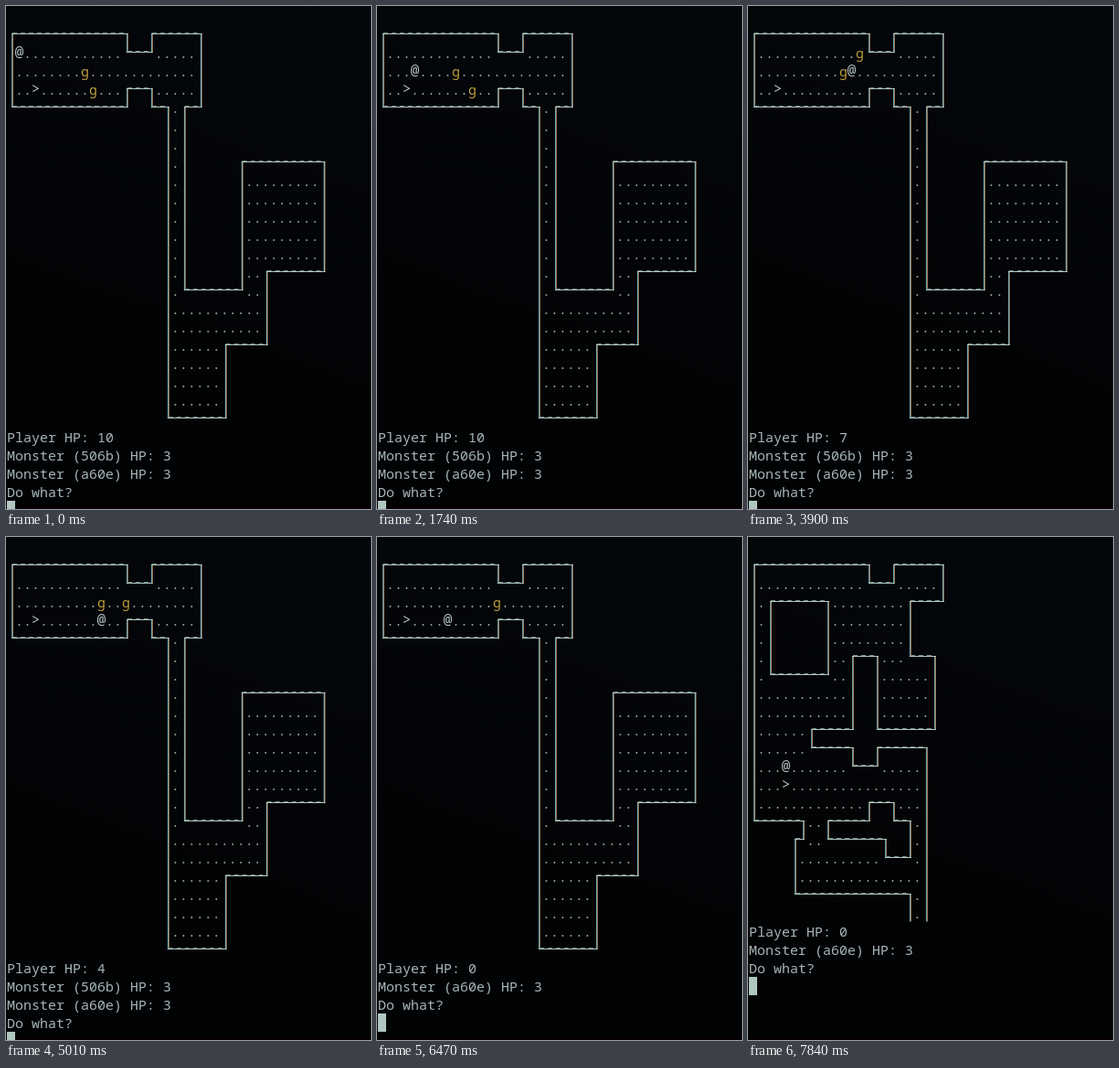
Write an HTML page that moves like this. It is 400 by 550 pixels and loops after 8 s.

```html
<!DOCTYPE html>
<html lang="en">
<head>
<meta charset="utf-8">
<title>Dungeon</title>
<style>
html, body { margin: 0; width: 100%; height: 100%; overflow: hidden; background: #020306; }
svg { display: block; width: 400px; height: 550px; background: linear-gradient(200deg, #04070b, #020305 60%, #010204); }
text { font: 15px "Noto Sans Mono", "DejaVu Sans Mono", monospace; white-space: pre; fill: #a6b6b8; font-variant-ligatures: none; }
.hero { font-size: 16px; transform: translate(-0.3px, -1px); fill: #b3c1c0; }
.goblin { fill: #bd9e3a; }
.floor { fill: #a0aaa7; }
path { fill: none; stroke-width: 1; }
.cool { stroke: #5a97a8; }
.warm { stroke: #a8835f; }
.flat { stroke: #b2c8c4; }
.rough { stroke: #6f8a86; stroke-dasharray: 5 4; }
</style>
</head>
<body>
<svg viewBox="0 0 400 550">
  <rect y="546" width="400" height="4" fill="#060204"/>
  <g id="walls"></g>
  <g id="chars"></g>
  <rect id="cursor" x="1" width="9" height="20" fill="#b0c7c1"/>
</svg>
<script>
const LOOP = 8000, CW = 9, CH = 20;
const DESCENT = 30, KILL = 19;   // turns
const BLINK_OFF = 500;

// Outlines as x, y, x, y...: each value turns the corner along the other axis.
const levels = [
  { rows: 23, stairs: [3, 4], loops: [
    [0,1, 14,2, 17,1, 23,5, 21,15, 28,8, 38,14, 31,18, 26,22, 19,5, 17,4, 14,5]
  ] },
  { rows: 21, stairs: [4, 13], loops: [
    [0,1, 14,2, 17,1, 23,3, 19,6, 22,10, 15,6, 12,10, 7,11, 12,12, 15,11, 21,20.5, 19,19, 5,16, 6,15],
    [2,3, 9,7],
    [14,14, 17,15, 19,17, 16,16, 9,15]
  ] }
];

// Bursts of key presses: [first, last, count]. Every press is one turn.
const turns = [
  [840, 1200, 3], [1740, 1740, 1], [2260, 2410, 2], [2740, 2900, 2], [3270, 3270, 1], [3600, 3900, 3],
  [4520, 5400, 6], [5570, 5570, 1], [5670, 5830, 2], [6150, 7160, 8], [7440, 7840, 2]
].flatMap(([a, b, n]) => Array.from({ length: n }, (_, i) => a + (b - a) * i / Math.max(1, n - 1)));

// Walks as key points [turn, x, y]; the cells between are interpolated.
const player = [[1,1,2], [3,3,2], [4,4,3], [12,12,3], [16,10,4], [22,10,4], [29,3,4], [30,4,13], [31,4,12]];
const goblinA = [[4,9,3], [7,10,2], [9,12,3], [12,13,2], [13,13,3], [20,15,3], [22,16,3], [25,13,3], [27,13,2], [29,14,3]];
const goblinB = [[3,10,4], [4,11,4], [7,10,4], [11,10,4], [12,11,3]];

const $ = id => document.getElementById(id);
const clamp = (v, lo, hi) => Math.min(hi, Math.max(lo, v));
const px = x => x * CW + 7;
const py = y => y * CH + 10.5;

function walk(keys, n) {
  const i = keys.findIndex(k => k[0] >= n);
  if (i < 1) return keys.at(i).slice(1);
  const [a, ax, ay] = keys[i - 1], [b, bx, by] = keys[i];
  const f = (n - a) / (b - a);
  return [Math.round(ax + (bx - ax) * f), Math.round(ay + (by - ay) * f)];
}

function prepare(level) {
  const vert = [], flat = [];
  for (const p of level.loops) {
    for (let i = 0; i < p.length; i += 2) {
      const x = p[i], y = p[i + 1], nextX = p[(i + 2) % p.length], prevY = p.at(i - 1);
      vert.push([x, Math.min(y, prevY), Math.max(y, prevY)]);
      flat.push([y, Math.min(x, nextX), Math.max(x, nextX)]);
    }
  }
  // Runs along x sit at the height reached by the previous corner.
  level.loops.forEach(p => p);
  const runs = [];
  for (const p of level.loops) {
    for (let i = 0; i < p.length; i += 2) {
      const y = p[i + 1], a = p[i], b = p[(i + 2) % p.length];
      if (Number.isInteger(p.at(i + 1))) runs.push([y, Math.min(a, b), Math.max(a, b)]);
    }
  }
  const within = (edges, fixed, v) => edges.some(([c, a, b]) => c === fixed && v >= a && v <= b);
  const isFloor = (x, y) => !within(vert, x, y) && !within(runs, y, x) &&
    vert.filter(([c, a, b]) => c < x && y >= a && y < b).length % 2 === 1;
  const line = (cls, d) => `<path class="${cls}" d="${d}"/>`;

  level.floor = Array.from({ length: level.rows }, (_, y) =>
    Array.from({ length: 40 }, (_, x) => isFloor(x, y) ? '.' : ' '));
  level.walls =
    vert.map(([x, a, b]) =>
      line('cool', `M${px(x) - 0.5} ${py(a)}V${py(b)}`) +
      line('warm', `M${px(x) + 0.5} ${py(a)}V${py(b)}`)).join('') +
    runs.map(([y, a, b]) =>
      line('flat', `M${px(a) - 1} ${py(y)}H${px(b) + 1}`) +
      line('rough', `M${px(a)} ${py(y) - 1}H${px(b)}`)).join('');
}

const text = (x, y, body, cls = '') =>
  `<text class="${cls}" x="${x * CW + 1}" y="${y * CH + 17}">${body}</text>`;

function draw(n) {
  const level = levels[n < DESCENT ? 0 : 1];
  const hp = clamp(KILL - n, 0, 10), foe = clamp(KILL - n, 0, 3);
  const hero = walk(player, n);

  const sprites = [[hero, '@', 'hero']];
  if (String(hero) !== String(level.stairs)) sprites.push([level.stairs, '&gt;', 'hero']);
  if (n < DESCENT) sprites.push([walk(goblinA, n), 'g', 'goblin']);
  if (foe) sprites.push([walk(goblinB, n), 'g', 'goblin']);

  const grid = level.floor.map(r => r.slice());
  for (const [[x, y]] of sprites) grid[y][x] = ' ';

  const lines = [`Player HP: ${hp}`];
  if (foe) lines.push(`Monster (506b) HP: ${foe}`);
  lines.push('Monster (a60e) HP: 3', 'Do what?');

  $('walls').innerHTML = level.walls;
  $('chars').innerHTML =
    grid.map((r, y) => text(0, y, r.join('').trimEnd(), 'floor')).join('') +
    sprites.map(([[x, y], c, cls]) => text(x, y, c, cls)).join('') +
    lines.map((s, i) => text(0, level.rows + i, s)).join('');
  $('cursor').setAttribute('y', (level.rows + lines.length) * CH + 1);
}

levels.forEach(prepare);
const start = performance.now();
let shown = -1;

function tick() {
  const t = (performance.now() - start) % LOOP;
  const n = turns.filter(at => at <= t).length;
  if (n !== shown) draw(shown = n);
  $('cursor').style.opacity = n === 0 && t >= BLINK_OFF ? 0 : 1;
  requestAnimationFrame(tick);
}
tick();
</script>
</body>
</html>
```
